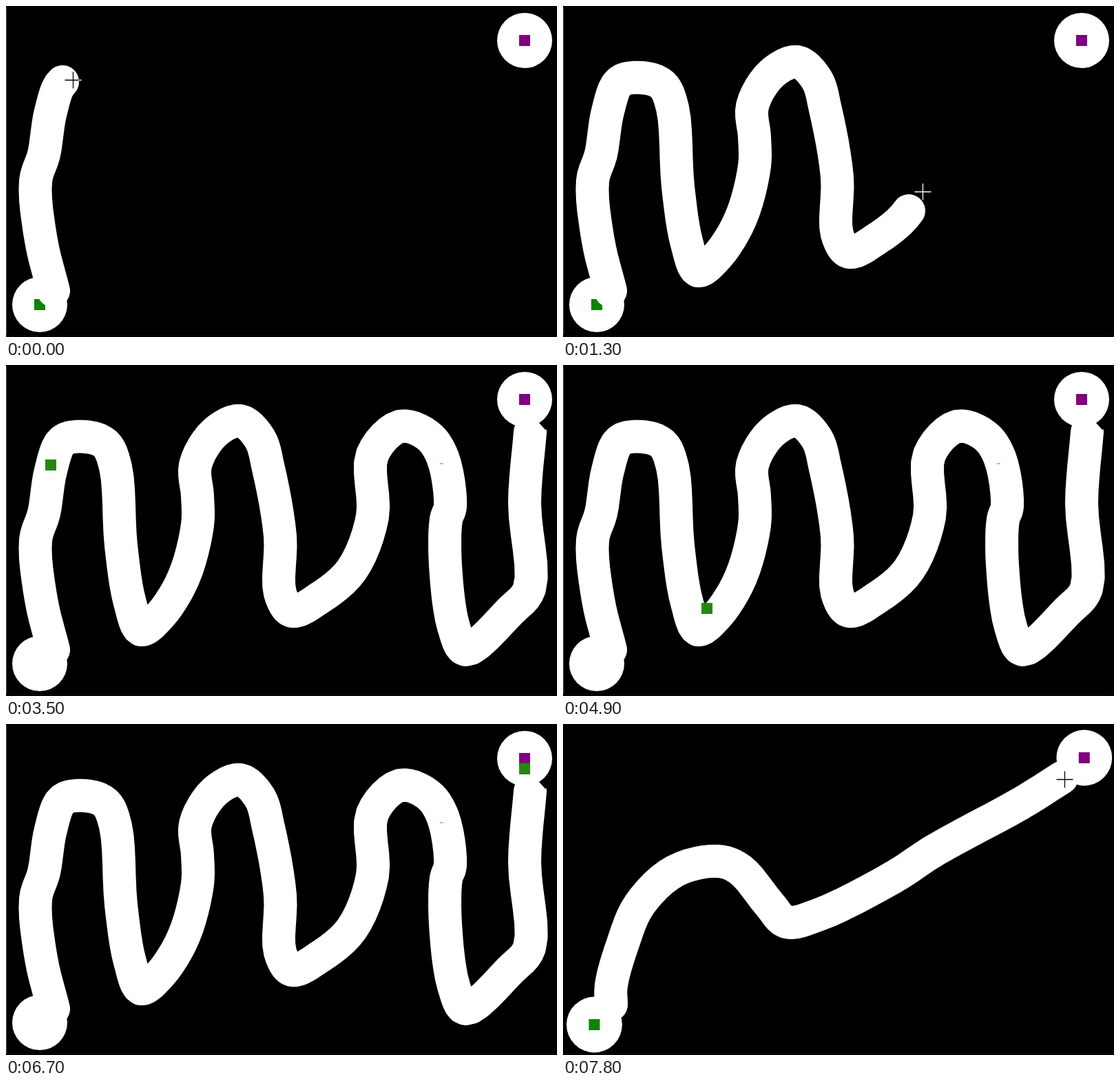
Recreate the animation shown at these times as an HTML page. Size 800 by 480 pixels, loop 8000 ms.

```html
<!DOCTYPE html>
<html lang="en">
<head>
<meta charset="utf-8">
<title>Maze drawing</title>
<style>
  html, body { margin: 0; width: 100%; height: 100%; overflow: hidden; background: #000; }
  svg { display: block; width: 800px; height: 480px; }
  #cursor { stroke: #fff; stroke-width: 1.3; mix-blend-mode: difference; }
</style>
</head>
<body>
<svg viewBox="0 0 800 480">
  <rect width="800" height="480"/>
  <rect y="477" width="800" height="3" fill="#100008"/>
  <rect id="edge" y="2" width="1" height="475" fill="#555"/>
  <circle id="startDisc" fill="#fff"/>
  <rect id="startMark" width="16" height="16" fill="#108208"/>
  <polyline id="track" fill="none" stroke="#fff" stroke-width="48" stroke-linecap="round" stroke-linejoin="round"/>
  <g id="flaws">
    <path d="M774 84L783 94L787 92V66H774Z"/>
    <path d="M65 98L66 92L71 95Z" fill="#fff"/>
    <path d="M630 143h1.5M633 143h1.5" stroke="#222"/>
  </g>
  <circle id="goalDisc" fill="#fff"/>
  <rect id="goalMark" width="16" height="16" fill="#800080"/>
  <rect id="agent" width="16" height="16" fill="#27860f"/>
  <path id="cursor" d="M-12 0H12M0-12V12"/>
</svg>
<script>
const LOOP = 8000, FRAME = 100, CELL = 16;
const $ = id => document.getElementById(id);
const clamp01 = v => Math.max(0, Math.min(1, v));
const ramp = (t, t0, t1, a, b) => a + (b - a) * clamp01((t - t0) / (t1 - t0));
const dist = (a, b) => Math.hypot(b[0] - a[0], b[1] - a[1]);

// Centripetal Catmull-Rom curve through the knots, as a dense polyline.
function smooth(knots, parts = 6) {
  const mirror = (a, b) => [2 * a[0] - b[0], 2 * a[1] - b[1]];
  const last = knots.length - 1;
  const all = [mirror(knots[0], knots[1]), ...knots, mirror(knots[last], knots[last - 1])];
  const out = [];
  for (let i = 1; i <= last; i++) {
    const [p, q, r, s] = all.slice(i - 1, i + 3);
    const a = Math.sqrt(dist(p, q)), b = Math.sqrt(dist(q, r)), c = Math.sqrt(dist(r, s));
    for (let j = 0; j < parts; j++) {
      const u = j / parts, v = 1 - u;
      out.push([0, 1].map(n => {
        const d = r[n] - q[n];
        const m = d + b * ((q[n] - p[n]) / a - (r[n] - p[n]) / (a + b));
        const k = d + b * ((s[n] - r[n]) / c - (s[n] - q[n]) / (b + c));
        return q[n] + u * u * (3 - 2 * u) * d + u * v * v * m - u * u * v * k;
      }));
    }
  }
  out.push(knots[last]);
  return out;
}

// A curve that can be measured and cut at any length.
function makeTrack(text) {
  const points = smooth(text.trim().split(/\s+/).map(p => p.split(',').map(Number)));
  const lengths = [0];
  for (let i = 1; i < points.length; i++) {
    lengths.push(lengths[i - 1] + dist(points[i - 1], points[i]));
  }
  const total = lengths[lengths.length - 1];
  const cut = s => {
    s = Math.max(0.01, Math.min(total, s));
    const i = lengths.findIndex(l => l >= s);
    const k = (s - lengths[i - 1]) / (lengths[i] - lengths[i - 1]);
    const tip = points[i].map((v, n) => points[i - 1][n] + (v - points[i - 1][n]) * k);
    return [...points.slice(0, i), tip];
  };
  const lengthAt = (x, y) => lengths[points.findIndex(p => dist(p, [x, y]) < 0.5)];
  return { total, cut, lengthAt, tip: s => cut(s).pop() };
}

const waves = makeTrack(`
  69,413 51,340 43,254 55,215 65,153 82,110 114,104 144,114 159,148
  167,262 180,345 196,384 224,363 258,308 278,232 278,190 275,145 303,98 340,81
  368,106 381,150 398,248 398,331 415,357 455,338 502,297 532,220 532,130 572,89
  612,102 634,134 645,205 639,224 638,290 650,380 667,413 732,357 760,324 753,200 761,97`);

const slope = makeTrack(`
  70,407 70,379 86,321 111,262 163,213 225,199 257,211 300,262 324,287
  370,277 480,222 540,183 665,115 724,78`);

// Routes are runs of grid steps such as "U3 R1".
function makeRoute(x, y, runs) {
  const cells = [[x, y]];
  const dirs = { U: [0, -1], D: [0, 1], R: [1, 0] };
  for (const run of runs.split(' ')) {
    const [dx, dy] = dirs[run[0]];
    for (let n = +run.slice(1); n > 0; n--) {
      x += dx * CELL;
      y += dy * CELL;
      cells.push([x, y]);
    }
  }
  return step => cells[Math.max(0, Math.min(cells.length - 1, Math.round(step)))];
}

const firstLeg = makeRoute(49, 433,
  'U13 R1 U5 R1 U2 R4 D3 R1 D6 R1 D3 R1 D3 R1 R1 U3 R1 U3 R1 U5');
const lastLeg = makeRoute(705, 385, 'U1 R1 U1 R1 U1 R1 U18');

function set(id, attrs) {
  for (const key in attrs) $(id).setAttribute(key, attrs[key]);
}
const show = (id, on) => set(id, { visibility: on ? 'visible' : 'hidden' });
const center = (id, x, y) => set(id, { x: x - 8, y: y - 8 });

function placeEnds(start, goal, r) {
  set('startDisc', { cx: start[0], cy: start[1], r });
  set('goalDisc', { cx: goal[0], cy: goal[1], r });
  center('startMark', ...start);
  center('goalMark', ...goal);
}

function drawTrack(track, s, lead) {
  const line = track.cut(s).map(p => p.map(v => v.toFixed(1)).join()).join(' ');
  set('track', { points: line });
  const [x, y] = track.tip(s + lead);
  set('cursor', { transform: `translate(${Math.round(x + 4) + 0.5} ${Math.round(y + 2) + 0.5})` });
}

function agentCell(t) {
  if (t >= 5400) return lastLeg((t - 5400) * 23 / 1300);
  if (t >= 3500) return firstLeg(19 + (t - 3500) * 26 / 1400);
  return firstLeg(ramp(t, 2600, 3500, 0, 19));
}

const early = waves.lengthAt(82, 110), middle = waves.lengthAt(502, 297);

function render(t) {
  const second = t >= 6900;
  const solving = t >= 2500 && !second;
  show('edge', !second);
  show('flaws', solving);
  show('agent', solving);
  show('startMark', !solving);
  show('cursor', !solving);
  if (second) {
    placeEnds([45.5, 436], [756.8, 49], 40.4);
    drawTrack(slope, ramp(t, 6900, 7800, 0, slope.total), 20);
  } else {
    placeEnds([49, 433], [753, 50], 40);
    const s = t < 1300 ? ramp(t, 0, 1300, early, middle) : ramp(t, 1300, 2400, middle, waves.total);
    drawTrack(waves, s, ramp(t, 0, 1300, 12, 34));
    center('agent', ...agentCell(t));
  }
}

const origin = performance.now();
function tick() {
  const t = (performance.now() - origin) % LOOP;
  render(Math.floor(t / FRAME) * FRAME);
  requestAnimationFrame(tick);
}
tick();
</script>
</body>
</html>
```
